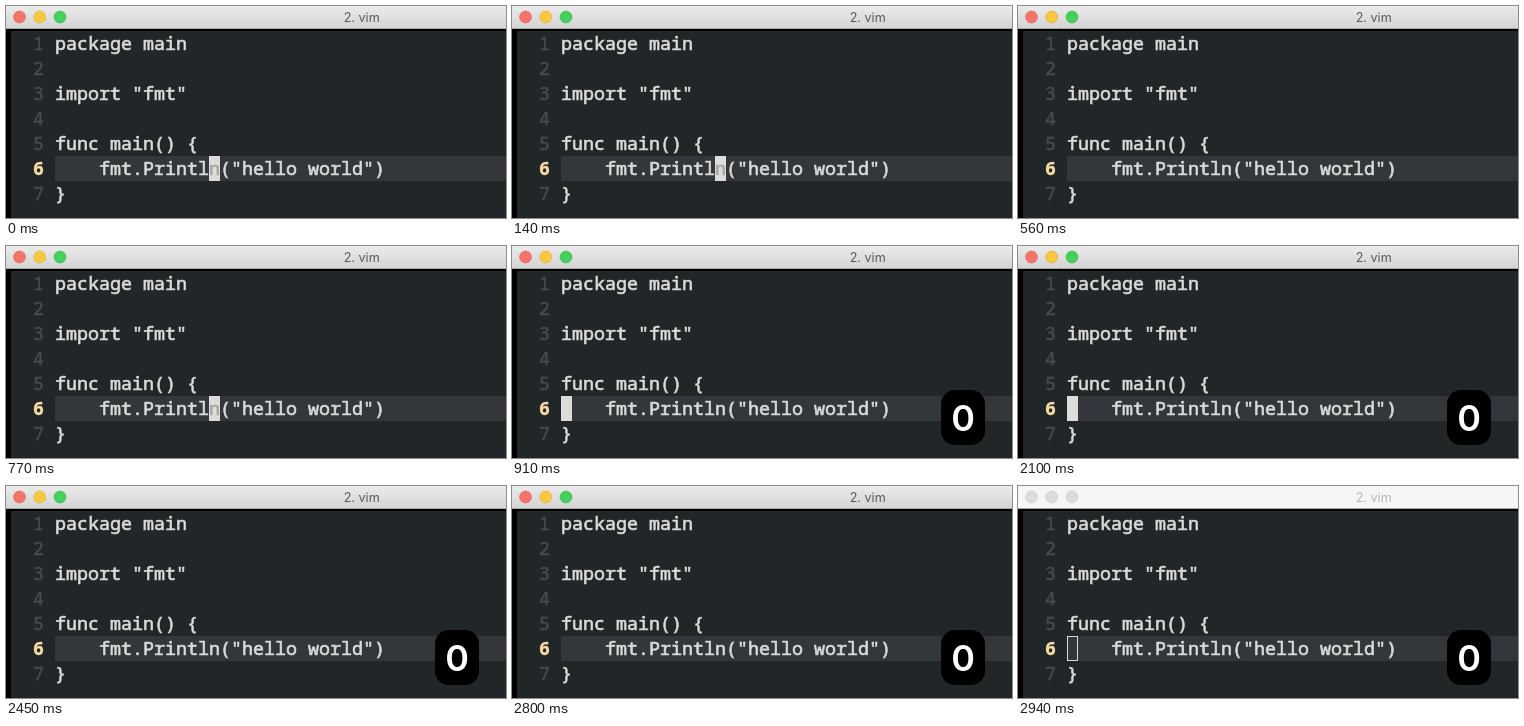
An HTML page for the animation above (3.01 s loop, 500 by 212 pixels).

```html
<!DOCTYPE html>
<html lang="en">
<head>
<meta charset="utf-8">
<title>vim</title>
<style>
  html, body { margin: 0; width: 100%; height: 100%; overflow: hidden; background: #000; }
  svg { display: block; width: 100%; height: 100%; }

  .code { font: 18.33px "Noto Sans Mono", monospace; fill: #d9dbd8; stroke: #d9dbd8; stroke-width: .65; }
  .number { fill: #484c4e; stroke: #484c4e; stroke-width: .4; }
  .current { fill: #f5dba2; stroke: #f5dba2; font-weight: 700; }
  .covered { fill: #a4a6a6; stroke: #a4a6a6; }
  .title { font: 12.6px Inter, sans-serif; text-anchor: middle; }
  .key { font: 600 36px Inter, sans-serif; text-anchor: middle; fill: #fff; }
  .cursor { fill: #dcdddb; stroke: none; }

  .timed { animation: 3010ms step-end infinite; }
  .word-cursor { animation-name: word-cursor; }
  .line-cursor { animation-name: line-cursor; }
  .keycap { animation-name: keycap; }
  .unfocused { animation-name: unfocused; }

  /* 560, 770, 910, 2450 and 2940 ms */
  @keyframes word-cursor {
    0% { opacity: 1; }
    18.605% { opacity: 0; }
    25.581% { opacity: 1; }
    30.233%, 100% { opacity: 0; }
  }
  @keyframes line-cursor {
    0% { opacity: 0; }
    30.233% { opacity: 1; }
    81.395%, 100% { opacity: 0; }
  }
  @keyframes keycap {
    0% { opacity: 0; }
    30.233%, 100% { opacity: 1; }
  }
  @keyframes unfocused {
    0% { opacity: 0; }
    97.674%, 100% { opacity: 1; }
  }
</style>
</head>
<body>
<svg viewBox="0 0 500 212">
  <defs>
    <linearGradient id="bar" x2="0" y2="1">
      <stop stop-color="#ebebeb"/>
      <stop offset="1" stop-color="#d4d4d4"/>
    </linearGradient>
  </defs>

  <rect width="500" height="212"/>
  <rect x="5" y="25" width="495" height="187" fill="#212629"/>
  <rect x="49" y="150" width="451" height="25" fill="#33373c"/>

  <rect width="500" height="22" fill="url(#bar)"/>
  <rect y="22" width="500" height="1" fill="#aaa"/>
  <g stroke-width=".7">
    <circle cx="13.5" cy="11" r="5.9" fill="#f4746c" stroke="#dc625b"/>
    <circle cx="33.7" cy="11" r="5.9" fill="#fcc83f" stroke="#dfae38"/>
    <circle cx="54" cy="11" r="5.9" fill="#45d05e" stroke="#39b34d"/>
  </g>
  <text class="title" x="355.7" y="16" fill="#5a5a5a">2. vim</text>

  <g class="code">
    <g class="number">
      <text x="27" y="44">1</text>
      <text x="27" y="69">2</text>
      <text x="27" y="94">3</text>
      <text x="27" y="119">4</text>
      <text x="27" y="144">5</text>
      <text x="27" y="169" class="current">6</text>
      <text x="27" y="194">7</text>
    </g>
    <text x="49" y="44">package main</text>
    <text x="49" y="94">import "fmt"</text>
    <text x="49" y="144">func main() {</text>
    <text x="93" y="169">fmt.Println("hello world")</text>
    <text x="49" y="194">}</text>
  </g>

  <g class="code timed word-cursor">
    <rect class="cursor" x="203" y="150" width="11" height="25"/>
    <text class="covered" x="203" y="169">n</text>
  </g>
  <rect class="cursor timed line-cursor" x="49" y="150" width="11" height="25"/>

  <g class="timed keycap">
    <rect x="429" y="144" width="44" height="55" rx="14"/>
    <text class="key" x="451" y="185">0</text>
  </g>

  <g class="timed unfocused">
    <rect width="500" height="22" fill="#f6f6f6"/>
    <g fill="#dcdcdc" stroke="#cacaca" stroke-width=".7">
      <circle cx="13.5" cy="11" r="5.9"/>
      <circle cx="33.7" cy="11" r="5.9"/>
      <circle cx="54" cy="11" r="5.9"/>
    </g>
    <text class="title" x="355.7" y="16" fill="#b4b4b4">2. vim</text>
    <rect x="49.5" y="150.5" width="10" height="24" fill="none" stroke="#d9dbd8"/>
  </g>
</svg>
</body>
</html>
```
